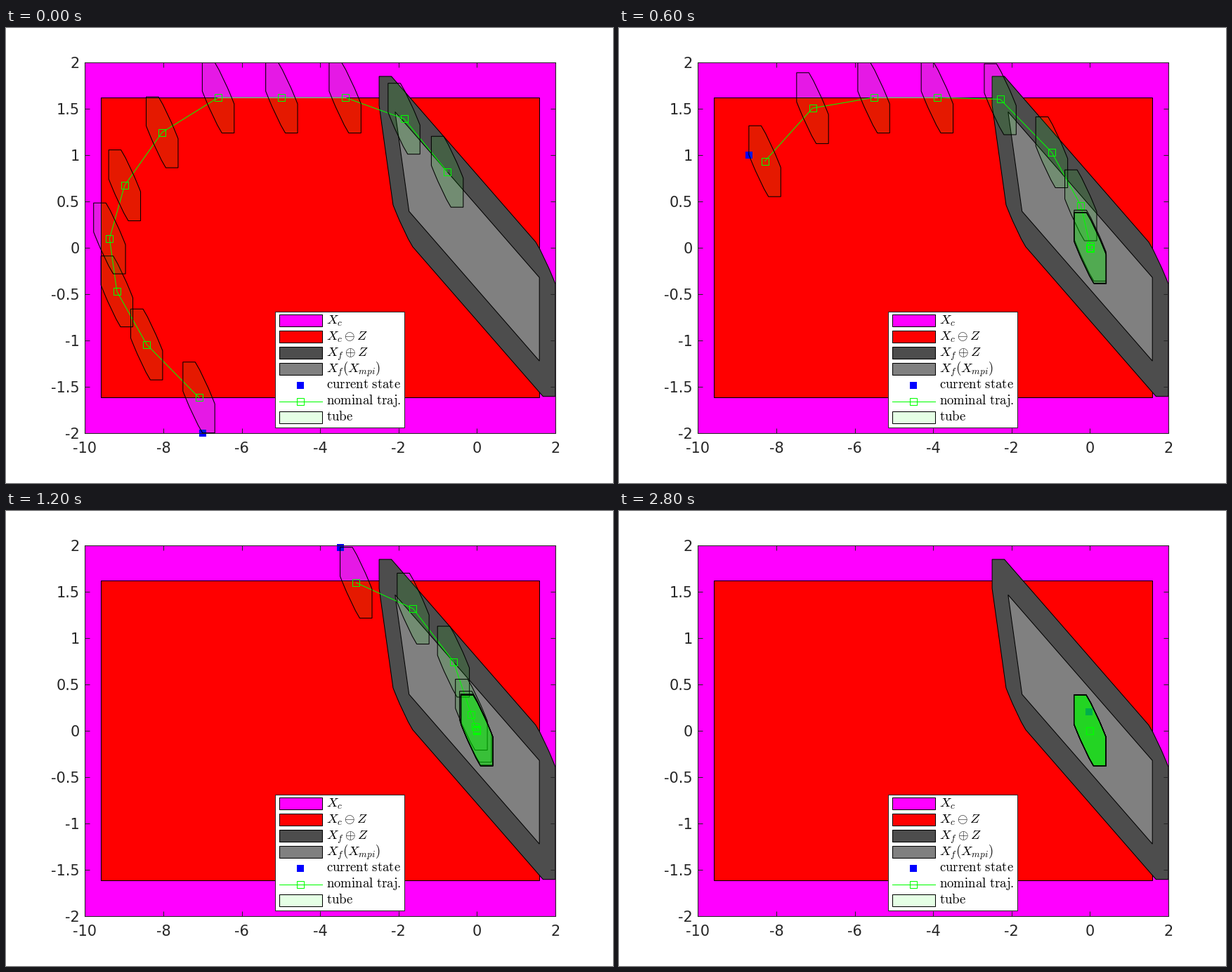
These frames come from a looping animation (864x648 px, 3 s). A matplotlib script:

```python
import numpy as np
import matplotlib.pyplot as plt
from matplotlib.animation import FuncAnimation
from matplotlib.patches import Polygon, Rectangle

plt.rcParams["font.family"] = "DejaVu Sans"
plt.rcParams["mathtext.fontset"] = "cm"

DPI, W, H = 150, 864, 648
PX = 72 / DPI            # points per pixel
LW = 0.5
INK = (0.15, 0.15, 0.15)
GREEN = (0, 1, 0)
N = 10                   # prediction horizon

# ---- double integrator with an LQR feedback
A = np.array([[1.0, 1.0], [0.0, 1.0]])
B = np.array([[0.5], [1.0]])
Q, R = np.eye(2), np.array([[0.1]])
P = Q.copy()
for _ in range(200):
    K = -np.linalg.solve(R + B.T @ P @ B, B.T @ P @ A)
    P = Q + A.T @ P @ (A + B @ K)
AK = A + B @ K

# ---- invariant error set Z: a zonotope with 8 generators
power = [np.linalg.matrix_power(AK, i) for i in range(5)]
scale = 0.15 / (1 - np.abs(power[4]).sum(axis=1).max())
gens = np.hstack(power[:4]).T * scale


def zonotope(g):
    g = np.where((g[:, 1] < 0)[:, None], -g, g)
    g = g[np.argsort(np.arctan2(g[:, 1], g[:, 0]))]
    steps = 2 * np.vstack([g, -g])
    return -g.sum(axis=0) + np.cumsum(steps, axis=0)


def hull(pts):
    pts = sorted(map(tuple, pts))

    def half(seq):
        out = []
        for p in seq:
            while len(out) > 1:
                (ax_, ay), (bx, by) = out[-2:]
                if (bx - ax_) * (p[1] - ay) - (by - ay) * (p[0] - ax_) > 1e-9:
                    break
                out.pop()
            out.append(p)
        return out[:-1]

    return np.array(half(pts) + half(pts[::-1]))


Z = zonotope(gens)
zx, zy = np.abs(gens).sum(axis=0)
umax = 1 - np.abs(gens @ K.T).sum()
X_LO, X_HI, Y_HI = -10 + zx, 2 - zx, 2 - zy

# ---- terminal set from its four active sides
row_x, row_k, row_ka = np.array([1.0, 0.0]), K[0], (K @ AK)[0]


def corner(r1, c1, r2, c2):
    return np.linalg.solve(np.array([r1, r2]), [c1, c2])


Xf = np.array([
    corner(row_ka, -umax, row_k, -umax),
    corner(row_x, X_HI, row_k, -umax),
    corner(row_x, X_HI, row_k, umax),
    corner(row_ka, -umax, row_k, umax),
])
XfZ = hull([p + z for p in Xf for z in Z])

# ---- condensed predictions: states as a linear map of (s0, v0..v9)
maps = [np.hstack([np.eye(2), np.zeros((2, N))])]
for k in range(N):
    nxt = A @ maps[-1]
    nxt[:, 2 + k] += B[:, 0]
    maps.append(nxt)
inputs = np.hstack([np.zeros((N, 2)), np.eye(N)])
hess = sum(m.T @ Q @ m for m in maps[:-1]) + maps[-1].T @ P @ maps[-1]
hess = hess + R[0, 0] * inputs.T @ inputs

normals = np.column_stack([-gens[:, 1], gens[:, 0]])
normals /= np.linalg.norm(normals, axis=1)[:, None]
z_reach = np.abs(normals @ gens.T).sum(axis=1)


def solve_qp(h, a, b):
    """Interior point method for min x'hx/2 subject to ax <= b."""
    x = np.zeros(h.shape[0])
    s = np.maximum(b - a @ x, 1.0)
    lam = np.ones(len(b))
    for _ in range(80):
        gap = s @ lam / len(b)
        rd, rp = h @ x + a.T @ lam, a @ x + s - b
        if gap < 1e-9 and np.abs(rp).max() < 1e-7:
            break
        rc = s * lam - 0.15 * gap
        lhs = h + a.T @ ((lam / s)[:, None] * a)
        dx = np.linalg.solve(lhs, -rd - a.T @ ((lam * rp - rc) / s))
        ds = -rp - a @ dx
        dl = (-rc - lam * ds) / s
        both, move = np.r_[s, lam], np.r_[ds, dl]
        neg = move < 0
        t = min(1.0, 0.95 * np.min(-both[neg] / move[neg])) if neg.any() else 1.0
        x, s, lam = x + t * dx, s + t * ds, lam + t * dl
    return x


def plan(state):
    xs = np.array([m[0] for m in maps])
    ys = np.array([m[1] for m in maps])
    end = maps[-1]
    start = normals @ maps[0]
    mid = normals @ state
    a = np.vstack([inputs, -inputs, xs, -xs, ys, -ys,
                   row_k @ end, -row_k @ end, -row_ka @ end, start, -start])
    n = len(maps)
    b = np.r_[np.full(2 * N, umax), np.full(n, X_HI), np.full(n, -X_LO),
              np.full(2 * n, Y_HI), [umax] * 3, mid + z_reach, z_reach - mid]
    theta = solve_qp(hess, a, b + 2e-4)
    return np.array([m @ theta for m in maps])


# measured state at each step of the disturbed run
states = np.array([
    (-7.0, -2.0), (-8.40, -1.12), (-9.14, -0.037), (-8.70, 1.0),
    (-7.166, 1.936), (-5.417, 1.74), (-3.49, 1.977), (-1.77, 1.478),
    (-0.685, 0.69), (-0.175, 0.20), (0.04, 0.014), (-0.03, 0.045),
    (-0.135, 0.04), (-0.13, -0.043), (-0.03, 0.20),
])
plans = [plan(s) for s in states]

# ---- static scene
fig = plt.figure(figsize=(W / DPI, H / DPI), dpi=DPI, facecolor="white")
ax = fig.add_axes([0.13, 0.11, 0.775, 0.815])
ax.set_xlim(-10, 2)
ax.set_ylim(-2, 2)
xt, yt = np.arange(-10, 3, 2), np.arange(-2, 2.1, 0.5)
ax.set_xticks(xt, [f"{v:g}" for v in xt])
ax.set_yticks(yt, [f"{v:g}" for v in yt])
ax.set_axisbelow(False)
ax.tick_params(direction="in", top=True, right=True, length=6.7 * PX,
               width=LW, color=INK, labelcolor=INK, labelsize=10)
ax.tick_params(axis="x", pad=12.5 * PX)
ax.tick_params(axis="y", pad=7.5 * PX)
for sp in ax.spines.values():
    sp.set(linewidth=LW, edgecolor=INK)


def box(x0, x1, y0, y1):
    return np.array([(x0, y0), (x1, y0), (x1, y1), (x0, y1)])


def region(pts, color, z):
    patch = Polygon(pts, closed=True, fc=color, ec="black", lw=LW,
                    joinstyle="miter", zorder=z)
    return ax.add_patch(patch)


MAGENTA, RED, DARK, GRAY = (1, 0, 1), (1, 0, 0), (0.3,) * 3, (0.5,) * 3
TUBE = (0, 1, 0, 0.1)
region(box(-10, 2, -2, 2), MAGENTA, 1.0)
region(box(X_LO, X_HI, -Y_HI, Y_HI), RED, 1.1)
region(XfZ, DARK, 1.2)
region(Xf, GRAY, 1.3)

# ---- legend in pixel coordinates
key = fig.add_axes([0, 0, 1, 1], zorder=5)
key.set_xlim(0, W)
key.set_ylim(H, 0)
key.axis("off")
key.add_patch(Rectangle((382.5, 403.5), 184.5, 165, fc="white", ec=INK, lw=LW))
square = dict(marker="s", mfc="none", mec=GREEN, mew=LW, ms=9.5 * PX)
labels = [r"$X_c$", r"$X_c\ominus Z$", r"$X_f\oplus Z$", r"$X_f(X_{mpi})$",
          r"$\mathrm{current\ state}$", r"$\mathrm{nominal\ traj.}$",
          r"$\mathrm{tube}$"]
fills = [MAGENTA, RED, DARK, GRAY, None, None, TUBE]
for i, (label, fill) in enumerate(zip(labels, fills)):
    y = 416.8 + 23.0 * i
    if fill:
        key.add_patch(Rectangle((388.5, y - 8.5), 61, 17, fc=fill,
                                ec="black", lw=LW))
    key.text(455.5, 422 + 22.85 * i, label, size=9, va="baseline", color="black")
key.plot([419], [509.3], "s", color="blue", ms=9.5 * PX, mew=0)
key.plot([388.5, 449.5], [531.8, 531.8], color=GREEN, lw=LW)
key.plot([419], [531.8], ls="none", **square)

# ---- moving parts
dot, = ax.plot([], [], "s", color="blue", ms=11 * PX, mew=0,
               clip_on=False, zorder=1.5)
path, = ax.plot([], [], color=GREEN, lw=LW, zorder=1.6)
flat, = ax.plot([], [], color=(0.65, 0.6, 0.63), lw=LW, zorder=1.65)
knots, = ax.plot([], [], ls="none", zorder=1.7, **square)
tubes = [region(Z, TUBE, 1.8 + 0.01 * i) for i in range(N + 1)]


def draw(i):
    pts = plans[i]
    dot.set_data(states[i, :1], states[i, 1:])
    path.set_data(pts[:, 0], pts[:, 1])
    knots.set_data(pts[:, 0], pts[:, 1])
    capped = pts[np.abs(pts[:, 1] - Y_HI) < 5e-3]
    flat.set_data(capped[:, 0], capped[:, 1])
    for tube, p in zip(tubes, pts):
        tube.set_xy(Z + p)
    return [dot, path, flat, knots, *tubes]


anim = FuncAnimation(fig, draw, frames=len(states), interval=200,
                     repeat=True, repeat_delay=0, blit=False)
plt.show()
```
